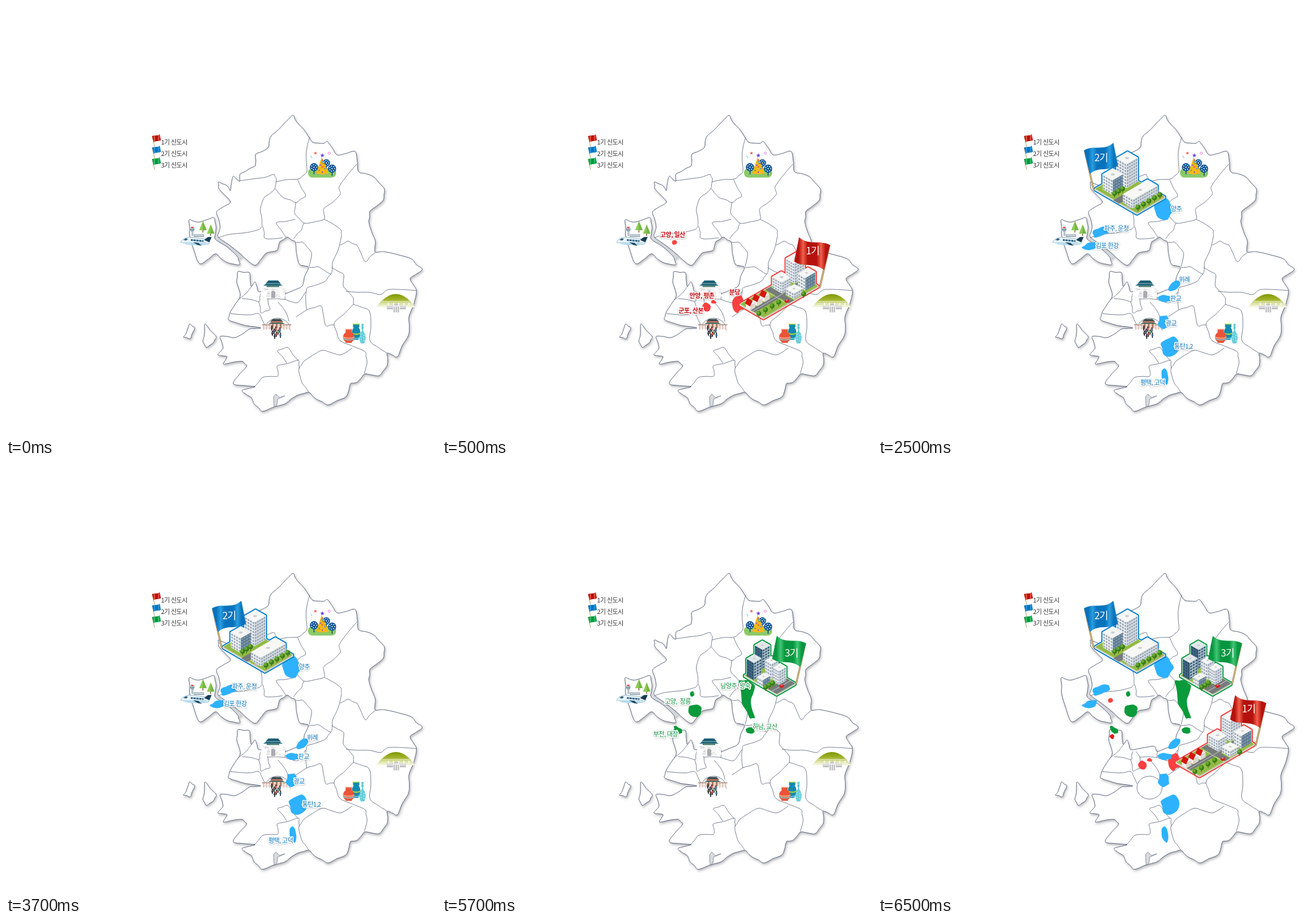
Animation, 749 px wide and 748 px high, one loop 8 s. Source, as an HTML page:

```html
<!DOCTYPE html>
<html lang="ko">
<head>
<meta charset="utf-8">
<style>
html, body { margin: 0; width: 100%; height: 100%; overflow: hidden; background: #fff; }
svg { display: block; width: 100%; height: 100%; }
text { font-family: "Noto Sans CJK KR", "Noto Sans KR", "Noto Sans CJK", sans-serif; font-size: 11px; letter-spacing: -.65px; white-space: pre; }
.land { fill: #fff; stroke: #56617c; stroke-width: 1; }
.border { fill: none; stroke: #626c84; stroke-width: .9; }
.tag text { font-weight: 500; stroke: #fff; stroke-width: 3.5px; stroke-linejoin: round; paint-order: stroke; filter: drop-shadow(0 1px 1px rgba(0,0,0,.22)); }
.tag.bold text { font-weight: 700; }
.num { font-size: 17px; letter-spacing: -1px; }
</style>
</head>
<body>
<svg viewBox="0 0 749 748" preserveAspectRatio="none">
  <defs>
    <filter id="shade" x="-10%" y="-10%" width="120%" height="120%">
      <feDropShadow dx="1.5" dy="2.5" stdDeviation="2.2" flood-color="#3c4048" flood-opacity=".38"/>
    </filter>
    <linearGradient id="hill" x2="0" y2="1"><stop offset="0" stop-color="#7f9800"/><stop offset=".45" stop-color="#a3b530"/><stop offset="1" stop-color="#fdfdf0"/></linearGradient>
  </defs>
  <g id="map"></g>
  <g id="legend"></g>
  <g id="sights"></g>
  <g id="layers"></g>
</svg>
<script>
const $ = id => document.getElementById(id);
const range = n => [...Array(n).keys()];
let seed = 7;
const random = () => (seed = seed * 16807 % 2147483647) / 2147483647;

// Catmull-Rom curve through points
function spline(p, closed) {
  const n = p.length;
  const at = i => closed ? p[(i + n) % n] : p[Math.max(0, Math.min(n - 1, i))];
  const handle = (s, q, r, k) => s.map((v, j) => (v + k * (r[j] - q[j]) / 6).toFixed(1));
  return 'M' + p[0] + range(closed ? n : n - 1).map(i => {
    const [a, b, c, d] = [at(i - 1), at(i), at(i + 1), at(i + 2)];
    return `C${handle(b, a, c, 1)} ${handle(c, b, d, -1)} ${c}`;
  }).join('') + (closed ? 'Z' : '');
}
// key points with a small seeded bend in the middle of each stretch
function rough(list, closed, bend = .1) {
  const p = list.trim().split(/\s+/).map(s => s.split(',').map(Number)), out = [];
  p.forEach(([x, y], i) => {
    out.push([x, y]);
    if (!closed && i === p.length - 1) return;
    const [u, v] = p[(i + 1) % p.length], k = (random() - .5) * bend;
    out.push([(x + u) / 2 + (v - y) * k, (y + v) / 2 - (u - x) * k]);
  });
  return spline(out, closed);
}

const path = (d, fill, more = '') => `<path d="${d}" fill="${fill}" ${more}/>`;
const line = (d, color, w = 1) => path(d, 'none', `stroke="${color}" stroke-width="${w}"`);
const rect = (x, y, w, h, fill, r = 0) => `<rect x="${x}" y="${y}" width="${w}" height="${h}" rx="${r}" fill="${fill}"/>`;
const oval = (x, y, rx, ry, fill) => `<ellipse cx="${x}" cy="${y}" rx="${rx}" ry="${ry}" fill="${fill}"/>`;
const dot = (x, y, r, fill) => oval(x, y, r, r, fill);
const text = (x, y, s, fill, cls = '') => `<text x="${x}" y="${y}" fill="${fill}" class="${cls}">${s}</text>`;
const land = list => `<path class="land" d="${rough(list, true)}"/>`;
const border = list => `<path class="border" d="${rough(list)}"/>`;

// uneven patch of land around a centre
function blob(fill, x, y, rx, ry = rx, tilt = 0) {
  const p = range(11).map(i => {
    const a = i * Math.PI * 2 / 11, r = .82 + random() * .36;
    return [x + rx * r * Math.cos(a), y + ry * r * Math.sin(a)];
  });
  return path(spline(p, true), fill, `transform="rotate(${tilt} ${x} ${y})"`);
}

// ---- map ----
const eastCoast = `500,190 510,206 523,221 534,237 553,239 560,236 577,259 608,253 614,288 640,297 659,318 657,338
  634,357 632,376 643,408 643,428 662,428 706,440 725,458 704,474 715,496 702,540 701,573 682,610 664,604 664,625
  650,643 625,640 612,654 600,657 592,680 561,694`;
const southCoast = `541,684 528,672 508,677 486,692 447,705 432,692 427,681 411,669 434,662 396,657 419,627 411,618
  379,623 385,610 369,607 378,595 373,575 398,577 424,562 444,560`;
const cityEdge = `418,556 388,546 391,532 408,505 402,480 404,462 424,464 427,488 434,480 441,497 480,491 487,500
  516,487 527,455 511,449 504,411 490,402 477,410 472,425 453,430 434,451 408,431 370,402`;
const westCoast = `373,384 367,358 391,341 371,318 370,306 384,312 391,321 396,296 407,305 408,292 424,283 434,278
  435,258 457,246 462,226 484,205`;

$('map').innerHTML = '<g filter="url(#shade)">' +
  line('M369 401L376 411 396 426 409 438', '#d3d6da', 6) +
  land(eastCoast + ' ' + southCoast + ' ' + cityEdge + ' ' + westCoast) +
  land('319,372 336,376 362,368 366,385 365,406 402,435 407,450 385,446 365,431 337,448 320,400') +
  land('320,553 329,560 321,579 309,576 314,569') +
  land('347,553 366,575 361,586 349,594 343,583 346,568') + '</g>' +
  path('M467 698L466 680 470 675 476 681 486 678 473 684 472 694Z', '#d9dbde', 'stroke="#626c84" stroke-width=".7"') +
  // northern districts
  border('529,228 523,255 524,288 509,301 470,306') +
  border('407,304 436,300 466,293 471,301 468,318 450,333 443,355 446,383') +
  border('469,318 484,334 505,342 522,330 508,302') +
  border('505,342 503,361 520,378 554,371 554,352 582,328 581,313 611,275') +
  border('504,371 471,377 488,403') +
  border('519,378 515,389 501,405') +
  border('370,403 400,396 440,389 447,384 451,404 482,403') +
  border('554,371 583,389 584,402 569,445 566,466 545,454 528,455') +
  border('505,411 517,411 532,429 528,453') +
  border('582,416 596,409 612,417 626,445 643,429') +
  // eastern districts
  border('567,455 588,467 588,488 605,508 605,519') +
  border('566,466 556,479 525,490 522,503 524,529') +
  border('592,496 614,498 652,502 668,493 715,495') +
  border('605,519 633,531 634,582 664,604') +
  border('605,519 572,551 582,582 625,601 629,619 624,639') +
  // southern districts
  border('603,595 582,607 551,599 519,618 510,632 516,656 527,671') +
  border('505,541 525,528 549,522 557,556 572,555') +
  border('432,663 447,646 473,644 473,626 509,616 511,630') +
  border('489,621 473,600 491,594 509,617') +
  path(spline(range(9).map(i => [473 + 22 * Math.cos(i * .7), 563 + 20 * Math.sin(i * .7)]), true), 'none', 'class="border"') +
  border('404,511 420,498 427,489') +
  border('391,535 413,537 440,535 451,556') +
  border('411,509 441,514 444,500') +
  border('440,514 444,534 460,528 456,510 449,500') +
  border('456,510 485,510 487,500') +
  border('474,515 487,532 493,549') +
  border('485,510 508,516 522,497');

// ---- flags: one cloth, mirrored or shrunk where needed ----
const cloths = { red: ['#b5120d', '#f2614b'], blue: ['#0873bd', '#2b9de0'], green: ['#079640', '#42c674'] };
document.querySelector('defs').insertAdjacentHTML('beforeend', Object.entries(cloths).map(([id, [deep, lit]]) =>
  `<linearGradient id="${id}">` + range(9).map(i => `<stop offset="${i / 8}" stop-color="${i === 2 || i === 6 ? lit : deep}"/>`).join('') + '</linearGradient>').join(''));
const flag = (x, y, color, size, dir = 1) => `<g transform="translate(${x} ${y}) scale(${size * dir} ${size})">` +
  line('M1 0L17 70', '#8f7440', 3) + line('M1 0L17 70', '#e6d09a', 1.2) +
  path('M0 0C17 -10 34 2 51 -13L59 27C42 38 27 27 10 41Z', `url(#${color})`) + '</g>';
$('legend').innerHTML = Object.keys(cloths).map((c, i) =>
  flag(254.5, 226.5 + i * 20, c, .26) + text(270, 241 + i * 19.8, `${i + 1}기 신도시`, '#333')).join('');

// ---- isometric town pieces; a runs left, b runs right, h up ----
const left = a => [-a * .866, -a / 2], right = b => [b * .866, -b / 2];
const tile = (x, y, a, b, fill) => path(`M${x} ${y}l${left(a)}l${right(b)}l${left(-a)}z`, fill);
const shell = ([x, y, a, b, h]) => `M${x} ${y}l${left(a)}v${-h}l${right(b)}l${left(-a)}v${h}z`;
function face(x, y, [dx, dy], h, fill, win) {
  const cols = Math.max(2, Math.round(Math.abs(dx) / 4)), rows = Math.max(1, Math.round(h / 5));
  const panes = range(cols * rows).map(k => {
    const u = (k % cols + .2) / cols, v = (Math.floor(k / cols) + .25) / rows, w = .6 / cols;
    return `M${x + dx * u} ${y + dy * u - h * v}l${dx * w} ${dy * w}v${-h * .5 / rows}l${-dx * w} ${-dy * w}z`;
  });
  return path(`M${x} ${y}l${dx} ${dy}v${-h}l${-dx} ${-dy}z`, fill) + (win ? path(panes.join(''), win) : '');
}
const white = ['#e9ebee', '#d3d8de', '#f7f7f6', '#8a9cae'];
const glass = ['#416782', '#a4bac6', '#e2e7e9', '#294b66'];
const mixed = ['#eef0f2', '#5d7c95', '#f5f5f4', '#8b9caa'];
const lawn = ['#d6d2c4', '#c3bfae', '#93bb45'];
const box = ([x, y, a, b, h, [l, r, top, win] = white]) =>
  face(x, y, left(a), h, l, win) + face(x, y, right(b), h, r, win) + tile(x, y - h, a, b, top) +
  (win ? oval(x + (b - a) * .433, y - h - (a + b) / 4, a / 6, a / 11, '#c9cdd0') : '');
const tree = (x, y) => line(`M${x} ${y}v5`, '#76502a', 1.2) + dot(x, y - 2, 4.4, '#397f1c') + dot(x - 1.3, y - 3.4, 2.6, '#65a92c');
const row = (n, x, y, dx, piece) => range(n).map(i => piece(x + dx * i, y - dx * i * .577)).join('');
const house = (x, y) => box([x, y, 9, 10, 8, ['#f4f1ec', '#ddd6ce', '#c8110d']]) +
  path(`M${x} ${y - 8}l${right(10)}l-4.300 -4.500z`, '#f4f1ec') +
  path(`M${x - .5} ${y - 7}l${left(10)}l4.300 -9.500l${left(-10)}z`, '#d8150f');
const car = (x, y) => path(`M${x - 4} ${y}l2 -3 4 -1 3 2 -1 3 -4 2z`, '#d72520') + line(`M${x - 1} ${y - 2}l3 -1`, '#dceaf2');
// the rim is every outer shape drawn once, thick, below the rest
function town(color, slab, paving, blocks) {
  const rim = [slab, ...blocks].map(shell).join('');
  return path(rim, color, `stroke="${color}" stroke-width="5.500" stroke-linejoin="round"`) +
    path(rim, '#f2f5f6', 'stroke="#f2f5f6" stroke-width="1.600"') + box(slab) + paving + blocks.map(box).join('');
}

const city1 = town('#ee3e3b', [560, 544, 47, 110, 2, lawn],
  tile(545, 533, 9, 110, '#777b7c') + tile(604, 517, 47, 10, '#777b7c') + line('M541 531L636 476M566 497L604 519', '#e8e8e8', .7),
  [[614, 483, 17, 20, 35], [592, 500, 19, 18, 19], [633, 495, 15, 20, 22, mixed], [613, 510, 16, 17, 10]]) +
  car(600, 514) + row(3, 562, 515, -12.5, house) + row(4, 552, 537, 11.5, tree) + tree(630, 503) +
  flag(676, 416, 'red', 1.06, -1) + text(634, 432, '1기', '#fff', 'num');

const city2 = town('#0a7fc8', [451, 362, 84, 56, 2, lawn],
  tile(420, 344, 12, 40, '#777b7c') + tile(438, 352, 8, 60, '#b3b8b5'),
  [[433, 317, 20, 22, 42], [409, 329, 20, 20, 26, mixed], [444, 352, 20, 49, 15]]) +
  row(3, 412, 328, 7, tree) + row(5, 453, 352, 9.5, tree) +
  flag(359, 251, 'blue', 1, 1) + text(377, 270, '2기', '#fff', 'num');

const city3 = town('#0a9c43', [583, 402, 65, 37, 2, lawn],
  tile(583, 400, 18, 37, '#777b7c') + line('M575 395L607 377', '#e8e8e8', .8),
  [[558, 357, 15, 15, 34, glass], [574, 375, 13, 13, 27], [543, 376, 14, 16, 30, glass], [587, 384, 12, 14, 24], [559, 388, 12, 14, 12, mixed]]) +
  row(3, 564, 390, 6, tree) + car(591, 387) +
  flag(634, 312, 'green', 1, -1) + text(597, 335, '3기', '#fff', 'num');

// ---- landmarks ----
const ring = (n, x, y, r, piece) => range(n).map(i => piece(x + r * Math.cos(i * 2 * Math.PI / n), y + r * Math.sin(i * 2 * Math.PI / n), i)).join('');
const ball = (x, y, r) => line(`M${x} ${y}v${r + 5}`, '#17477d', 1.6) + dot(x, y, r, '#125596') +
  ring(7, x, y, r * .62, (u, v) => dot(u, v, 1, '#d9effb')) + dot(x, y, 1.1, '#fff');
const star = (x, y, r, c) => path('M' + range(10).map(i => {
  const a = i * Math.PI / 5 - Math.PI / 2, q = i % 2 ? r * .45 : r;
  return [x + q * Math.cos(a), y + q * Math.sin(a)];
}).join('L') + 'Z', c);
const gems = ['#e84d43', '#2c9edb', '#43aa50', '#8b55c9'];
const park = rect(526, 282, 49, 16.5, '#8bca68', 8) + ball(558, 273, 6.5) +
  path('M550 263L540 291Q551 295 562 291Z', '#f7b719') +
  range(8).map(i => dot(551 + (i % 3 - 1) * i * .9, 268 + i * 3, 1.2, gems[i % 4])).join('') +
  star(551, 260, 4, '#704cdf') + ball(536.5, 280.5, 7.2) + ball(568, 283, 7.2) + star(539, 256, 3, '#f05a45') +
  '<circle cx="563" cy="256" r="2" fill="none" stroke="#ea78db"/>' + line('M530 261q4 0 2 4', '#62c7ee');

const pine = (x, y) => line(`M${x} ${y + 13}v7`, '#8a5934', 1.5) + path(`M${x} ${y}l6.500 16h-13z`, '#8ccb55') + path(`M${x} ${y}l6.500 16h-6.500z`, '#74b643');
const airport = pine(343, 374) + pine(356.5, 380) + rect(323, 391, 3.5, 9, '#b4c4cd') + path('M320 387h9l-2 5h-5z', '#8aa5b4') +
  rect(322, 384, 5, 2.5, '#e04b4b', 1) + rect(327, 397, 18, 5, '#a5b4bd') + line('M328 399h16', '#e9f0f3') +
  path('M304 411Q308 403 319 402L346 405 352 402 358 402 353 414Q334 418 304 411Z', '#e9f5fb', 'stroke="#8aaabd" stroke-width=".8"') +
  path('M345 407L352 402H358L354 411Z', '#183d52') + path('M305 411Q328 411 354 411 337 418 315 415Z', '#b9dced') +
  line('M322 407L344 409', '#2e6285', 3.2) + range(4).map(i => line(`M${326 + i * 5} 405v6`, '#eff8fc')).join('') +
  path('M309 407l4 -3 4 1 -3 3z', '#315e7c') + path('M326 411l9 1 6 5 -7 -1z', '#1f4d65');

const roof = (x, y, w, h, c) => path(`M${x + 5} ${y}h${w - 10}q2 ${h - 2} 5 ${h}h${-w}q3 -2 5 ${-h}z`, c);
const fort = path('M446 491Q465 486 484 491L487 505Q467 513 443 505Z', '#fff') + rect(454, 489, 23, 17, '#f6f6f6') +
  range(22).map(() => rect(448 + random() * 34, 491 + random() * 14, 3, 1.2, '#d2d2d4')).join('') +
  path('M462 508v-10q3.500 -6 7 0v10z', '#a9abae') + rect(454, 483, 22, 6, '#5c8c82') + rect(456, 485, 18, 1.5, '#c28a63') +
  roof(452, 477.5, 27, 5, '#165b72') + roof(448, 483, 34, 3.5, '#246b7c');

const coats = ['#3b353a', '#b94437', '#326c99', '#303443', '#4d8b61'];
const person = (x, y, coat) => dot(x, y, 1.3, '#3a2a27') + rect(x - 1.6, y + 1.2, 3.2, 4, coat, 1) + rect(x - 1, y + 5, 2, 2.5, '#303541');
const court = oval(471, 566, 24, 18, '#fff') + rect(447, 555, 49, 7, '#f6ebe6') +
  range(10).map(i => rect(448 + i * 5, 555, 1.6, 8, '#d8bdb2')).join('') + line('M446 554.5H497', '#a9847a', 1.6) +
  rect(461, 552, 21, 8, '#ead3c6') + range(3).map(i => rect(463 + i * 7, 553, 3, 7, '#b07a68')).join('') +
  roof(460, 544.5, 23, 4, '#344b4b') + line('M461 549.5H482', '#d44d38', 1.8) + roof(457, 550.5, 29, 2.5, '#426b5d') +
  range(9).map(i => person(463 + i * 7 % 17, 557 + i * 1.8, coats[i % 5])).join('');

const vase = (x, y, rx, ry, neck, c, trim) => path(`M${x - neck} ${y - ry * 1.35}h${neck * 2}v${ry * .5}h${-neck * 2}z`, c) +
  oval(x, y, rx, ry, c) + rect(x - rx * .55, y + ry * .6, rx * 1.1, ry * .4, c) +
  line(`M${x - rx} ${y}q${rx} 4 ${rx * 2} 0`, trim, 2.4) + line(`M${x - neck - .5} ${y - ry * 1.35}h${neck * 2 + 1}`, trim, 1.6);
const vases = vase(610, 569, 7.5, 11.5, 5.5, '#118ab1', '#a7cf3f') + line('M604 577q6 3 11 0', '#62d0de', 1.6) +
  vase(597, 576, 10, 10, 5.5, '#ec5339', '#fb9c7c') + line('M588 579q9 4 18 0', '#79d2d7', 1.6) +
  path('M619 553h4l-1 12q8 10 2 22h-6q-6 -12 2 -22z', '#69cddd') +
  range(6).map(i => dot(618.5 + i % 2 * 5, 571 + i * 2.2, .9, '#c7f2f3')).join('') + line('M619 560h4', '#2aa9c4');

const tomb = path('M645 524Q662 501 679 501 697 501 712 524Z', 'url(#hill)') +
  range(4).map(i => line(`M${655 - i * 3} ${514 + i * 3}H${703 + i * 4}`, '#f6f7d8', 1.2)).join('') +
  rect(663, 521, 34, 7, '#dcdcde') + line('M664 526h32', '#b4b5b8', 1.6) + rect(674, 520, 12, 13, '#f0f0f0') +
  path('M672 521l8 -4 8 4z', '#c8c9cb') + range(3).map(i => rect(675.5 + i * 3.5, 523, 1.6, 10, '#b0b1b4')).join('') +
  range(5).map(i => line(`M${666 + i * 9} 516v5`, '#fff', 1.6)).join('');

$('sights').innerHTML = park + airport + fort + court + vases + tomb;

// ---- new towns ----
const patches = (fill, list) => list.map(p => blob(fill, ...p)).join('');
const areas1 = patches('#fb4141', [[405, 411, 4], [461, 524, 7], [473, 515, 4, 3], [516, 518, 10, 14]]);
const areas2 = patches('#2eb2ff', [[497, 354, 16, 18], [387, 393, 16, 8, -15], [369, 418, 14, 6, -15], [517, 486, 13, 6, -42],
  [500, 509, 13, 6], [498, 550, 10, 11], [508, 592, 15, 16], [500, 643, 6, 14, -15]]);
const areas3 = patches('#0a9a3b', [[440, 430, 13, 11], [436, 400, 3.5, 4.5], [537, 463, 8, 6], [411, 463, 9, 5, 35]]) +
  path(rough('517,377 533,376 545,386 538,411 545,441 536,442 523,418 521,398', true), '#0a9a3b');
const extra = blob('#ed1515', 408, 474, 4);

const tags = (color, list, cls = '') => `<g class="tag ${cls}">` + list.map(([x, y, s]) => text(x, y, s, color)).join('') + '</g>';
const tags1 = tags('#c60b10', [[380, 402, '고양, 일산'], [431, 508, '안양, 평촌'], [412, 534, '군포, 산본'], [500, 502, '분당']], 'bold');
const tags2 = tags('#0873bb', [[510, 357, '양주'], [394, 391, '파주, 운정'], [379, 421, '김포 한강'], [524, 480, '위례'],
  [509, 513, '판교'], [501, 556, '광교'], [516, 596, '통탄1,2'], [457, 659, '평택, 고덕']]);
const tags3 = tags('#078f38', [[485, 390, '남양주, 왕숙'], [388, 417, '고양,  창릉'], [541, 461, '하남, 교산'], [368, 474, '부천, 대장']]);

// content and the phases that show it
const layers = [[areas1, '14'], [areas2, '24'], [areas3, '34'], [extra, '4'],
  [city1, '14'], [city2, '24'], [city3, '34'], [tags1, '1'], [tags2, '2'], [tags3, '3']];
$('layers').innerHTML = layers.map(([m]) => `<g>${m}</g>`).join('');
const groups = [...$('layers').children];

function draw(t) {
  const phase = Math.floor((t + 1500) / 2000);
  const show = (el, on) => el.setAttribute('display', on ? 'inline' : 'none');
  show($('sights'), phase < 4);
  groups.forEach((g, i) => show(g, layers[i][1].includes(phase)));
}
const begin = performance.now();
function tick(now) {
  draw(Math.max(0, now - begin) % 8000);
  requestAnimationFrame(tick);
}
draw(0);
requestAnimationFrame(tick);
</script>
</body>
</html>
```
